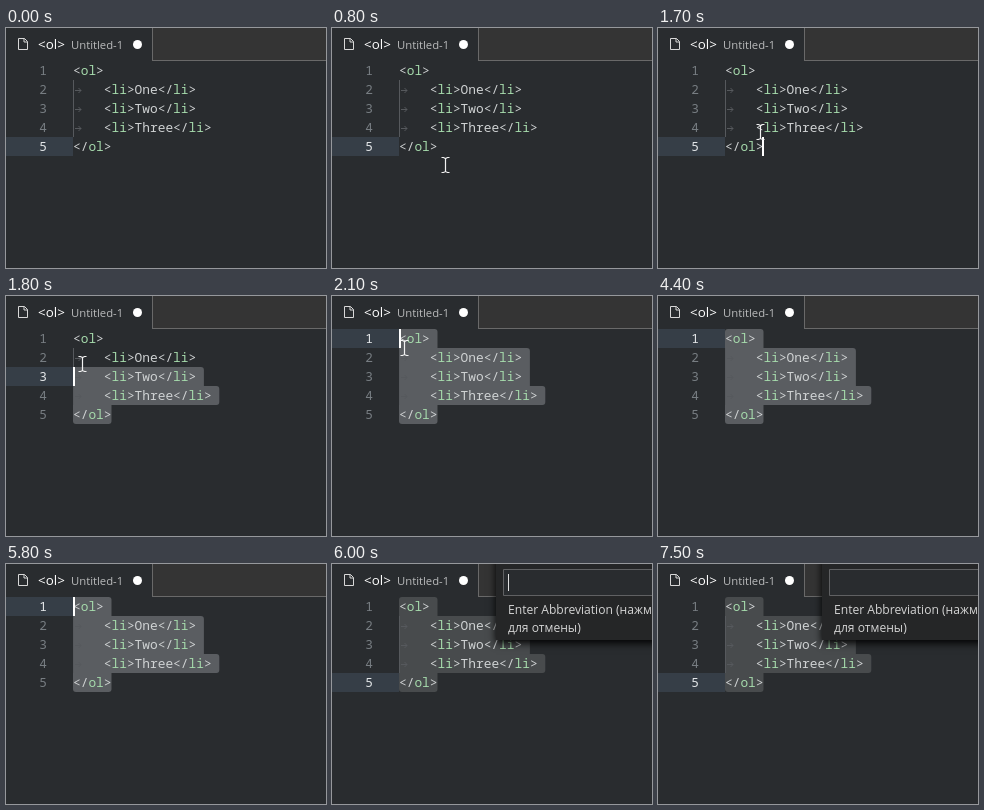
These frames come from a looping animation (320 px wide and 240 px high, 8 s). An HTML page with a canvas:

```html
<!DOCTYPE html>
<html lang="en">
<head>
<meta charset="utf-8">
<title>Wrapping a list in an editor</title>
<style>
  html, body { margin: 0; width: 100%; height: 100%; overflow: hidden; background: #292c2f; }
  canvas { display: block; }
</style>
</head>
<body>
<canvas id="stage" width="320" height="240"></canvas>
<script>
const ctx = document.getElementById('stage').getContext('2d');
const LOOP = 8000;
const LEFT = 67, TOP = 33, LINE = 19, CHAR = 7.7;
const CODE_FONT = '12.83px "Noto Sans Mono", monospace';
const UI_FONT = '"Open Sans", "Noto Sans", sans-serif';
const COLOR = {
  back: '#292c2f', tabs: '#343434', border: '#696969', active: '#363e47',
  selection: '#5a5d61', dimSelection: '#484b4d', marks: '#56595d',
  text: '#cfd2d3', tag: '#a5d9ab', number: '#777d82', white: '#fff', panel: '#252627'
};
const lines = ['<ol>', '\t<li>One</li>', '\t<li>Two</li>', '\t<li>Three</li>', '</ol>'];

// [start, shape, x, y]; each pose holds until the next one
const pointer = [
  [0], [600, 'arrow', 46, 37], [700, 'beam', 86, 104], [800, 'beam', 113, 137],
  [1000, 'beam', 113, 132], [1100, 'beam', 113, 126], [1300, 'beam', 111, 118],
  [1600, 'beam', 109, 115], [1700, 'beam', 102, 104], [1800, 'beam', 76, 68],
  [1900, 'beam', 72, 52], [2500, 'beam', 70, 53], [2600, 'hand', 62, 50],
  [2700, 'hand', 61, 51], [2800, 'hand', 63, 76], [2900, 'beam', 73, 128],
  [3000, 'beam', 88, 230], [3100]
];
// [start, first selected line]
const selections = [[0, 5], [1800, 2], [1900, 1], [2100, 0]];
const blinks = [2600, 3100, 3500, 4000, 4400, 4900, 5300, 5800];

const at = (keys, t) => keys.filter(key => key[0] <= t).pop();
const lineTop = i => TOP + i * LINE;
const columns = line => line.replace('\t', '    ').length;

function rect(color, x, y, w, h) {
  ctx.fillStyle = color;
  ctx.fillRect(x, y, w, h);
}

function text(string, x, y, font, color) {
  ctx.font = font;
  ctx.fillStyle = color;
  ctx.fillText(string, x, y);
}

function stroke(path, color, width = 1) {
  ctx.strokeStyle = color;
  ctx.lineWidth = width;
  ctx.stroke(new Path2D(path));
}

function drawTabs() {
  rect(COLOR.tabs, 147, 0, 173, 32);
  rect(COLOR.border, 146, 0, 1, 33);
  rect(COLOR.border, 146, 32, 174, 1);
  stroke('M12.5 10.5H18.5L21.5 13.5V21.5H12.5ZM18 10.5V14H21.5', '#d8d8d8');
  text('<ol>', 32, 21, '13.4px ' + UI_FONT, COLOR.white);
  text('Untitled-1', 65, 21, '11.3px ' + UI_FONT, '#b9babb');
  ctx.fillStyle = COLOR.white;
  ctx.beginPath();
  ctx.arc(131.5, 16.5, 4.5, 0, 7);
  ctx.fill();
}

function drawSelection(first, color) {
  const width = i => i < 0 || i < first || i > 4 ? 0
    : (columns(lines[i]) + (i < 4 ? 1 : 0)) * CHAR;
  ctx.fillStyle = color;
  for (let i = first; i < 5; i++) {
    const w = width(i), above = width(i - 1), below = width(i + 1);
    ctx.beginPath();
    ctx.roundRect(LEFT, lineTop(i), w, LINE, [
      i === first ? 3 : 0, w > above ? 3 : 0, w > below ? 3 : 0, i === 4 ? 3 : 0
    ]);
    ctx.fill();
  }
}

function drawCode(activeLine) {
  lines.forEach((line, i) => {
    const base = lineTop(i) + 14;
    const isActive = i === activeLine;
    text(i + 1, 33.3, base, CODE_FONT, isActive ? '#e2e5e7' : COLOR.number);
    let x = LEFT;
    if (line[0] === '\t') {
      const y = lineTop(i) + 10.5;
      stroke(`M69 ${y}H75M72.5 ${y - 2.5}L75 ${y}L72.5 ${y + 2.5}`, COLOR.marks);
      x += 4 * CHAR;
    }
    for (const part of line.trim().match(/<\/?|>|\w+/g)) {
      text(part, x, base, CODE_FONT, /^[ol]l$|^li$/.test(part) ? COLOR.tag : COLOR.text);
      x += part.length * CHAR;
    }
  });
}

function drawPanel(t) {
  ctx.save();
  ctx.shadowColor = '#000';
  ctx.shadowBlur = 8;
  ctx.shadowOffsetY = 3;
  rect(COLOR.panel, 164, -10, 180, 86);
  ctx.restore();
  rect(COLOR.back, 171, 5, 150, 27);
  stroke('M321 5.5H171.5V31.5H321', '#606163');
  if (t % 1000 < 500) rect('#e0e0e0', 176, 10, 1, 17);
  const font = '12.1px ' + UI_FONT;
  text('Enter Abbreviation (нажмите', 176, 50, font, '#d4d4d4');
  text('для отмены)', 176, 68, font, '#d4d4d4');
}

const shapes = {
  beam() {
    const path = 'M-3.5 -7.5H-1.5L.5 -6.5L2.5 -7.5H4.5M.5 -6.5V6.5M-3.5 7.5H-1.5L.5 6.5L2.5 7.5H4.5';
    stroke(path, '#f2f2f2', 1.2);
  },
  arrow() {
    outline('M.5 .5V16.5L4.5 13L7 18.5L9.5 17.5L7 12H12Z');
  },
  hand() {
    outline('M-2 14V2Q-2 0 0 0Q2 0 2 2V8Q4 6.5 5.5 8.5Q7.5 7.5 8.3 9.5Q10 9 10 11V16' +
      'Q10 19 8 22H-1Q-2 19 -5 15Q-6.5 12.5 -5 12Q-3.5 11.7 -2 14Z');
    stroke('M2 8V12M5.5 9V12M8.2 10V13', '#111', .8);
  }
};

function outline(path) {
  ctx.fillStyle = COLOR.white;
  ctx.fill(new Path2D(path));
  stroke(path, '#111');
}

function drawPointer(t) {
  const [, shape, x, y] = at(pointer, t);
  if (!shape) return;
  ctx.save();
  ctx.translate(x, y);
  shapes[shape]();
  ctx.restore();
}

function drawChevron(t) {
  if (t < 2500 || t >= 3300) return;
  const step = Math.floor(t / 100);
  ctx.globalAlpha = Math.min(1, (step - 24) / 3, (33 - step) / 4);
  stroke('M51.5 41.5L56 45.5L60.5 41.5', '#c8cacc', 1.2);
  ctx.globalAlpha = 1;
}

function draw(t) {
  const first = at(selections, t)[1];
  const panelOpen = t >= 6000;
  const activeLine = panelOpen ? 4 : Math.min(first, 4);

  rect(COLOR.back, 0, 0, 320, 240);
  drawTabs();
  rect(COLOR.active, 0, lineTop(activeLine), LEFT, LINE);
  drawSelection(first, panelOpen ? COLOR.dimSelection : COLOR.selection);
  rect(COLOR.marks, LEFT, lineTop(1), 1, 3 * LINE);
  drawCode(activeLine);
  drawChevron(t);

  const blinkOn = blinks.filter(time => time <= t).length % 2 === 0;
  if (t >= 1600 && !panelOpen && blinkOn) {
    rect(COLOR.white, first > 4 ? 104 : LEFT, lineTop(activeLine), 2, LINE);
  }
  if (panelOpen) drawPanel(t);
  drawPointer(t);
}

function frame() {
  draw(performance.now() % LOOP);
  requestAnimationFrame(frame);
}
frame();
</script>
</body>
</html>
```
